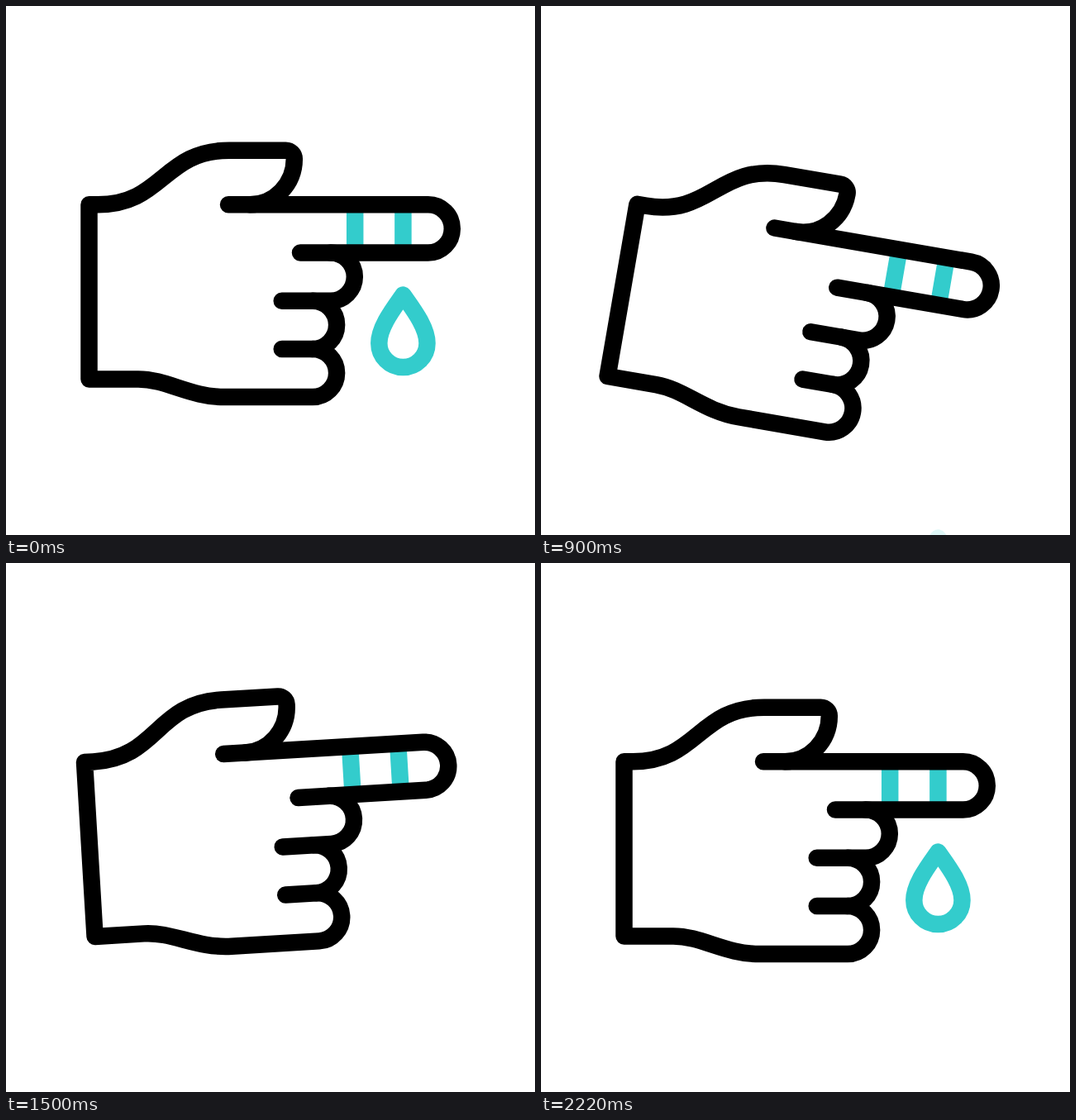
Animation, 640 px wide and 640 px high, one loop 2.4 s. Source, as an HTML page:

```html
<!DOCTYPE html>
<html lang="en">
<head>
<meta charset="utf-8">
<title>Finger prick</title>
<style>
  html, body { margin: 0; width: 100%; height: 100%; overflow: hidden; background: #fff; }
  svg { display: block; width: 100%; height: 100%; }
  path { fill: none; stroke: #000; stroke-width: 20.5; stroke-linecap: round; stroke-linejoin: round; }
  .teal { stroke: #3cc; }
  .flat { stroke-linecap: butt; }
</style>
</head>
<body>
<svg viewBox="0 0 640 640">
  <g id="drop">
    <path class="teal" d="M480.4 349.5C470 364.5 451.3 388 451.3 408a29.1 29.1 0 0 0 58.2 0C509.5 388 490.8 364.5 480.4 349.5Z"/>
  </g>
  <g id="hand">
    <path class="teal flat" d="M422.2 245V294M480.4 245V294"/>
    <path d="M269 240.3H510.7a29.1 29.1 0 0 1 0 58.2H356"/>
    <path d="M392.7 298.5a29.1 29.1 0 0 1 0 58.2H333.7"/>
    <path d="M371 356.7a29.1 29.1 0 0 1 0 58.2H333.7"/>
    <path d="M371 414.9a29.1 29.1 0 0 1 0 58.2H265C222 473.1 195 451.5 160 451.5H100.5V240.3H111C190 240.3 190 174.7 270 174.7H338.5a10.3 10.3 0 0 1 10.3 10.3C348.8 215.5 324.7 240.3 295 240.3"/>
  </g>
</svg>
<script>
  const LOOP = 2400;
  const PIVOT = '111 333';
  const DROP_X = 480.4, DROP_Y = 393.2;
  const FALL = 307, RISE = 124;

  // [time in ms, hand angle in degrees]
  const SWING = [[200, 0], [800, 11], [1400, -5], [1800, 5], [2200, 0]];

  const hand = document.getElementById('hand');
  const drop = document.getElementById('drop');

  const progress = (t, from, to) => Math.min(1, Math.max(0, (t - from) / (to - from)));
  const smooth = u => u * u * (3 - 2 * u);
  const eased = (t, from, to) => smooth(progress(t, from, to));

  function swingAngle(t) {
    let angle = SWING[0][1];
    for (let i = 1; i < SWING.length; i++) {
      const [from, a] = SWING[i - 1], [to, b] = SWING[i];
      angle += (b - a) * eased(t, from, to);
    }
    return angle;
  }

  function render(t) {
    const turn = `rotate(${swingAngle(t)} ${PIVOT})`;
    hand.setAttribute('transform', turn);

    if (t < 1400) {
      drop.setAttribute('transform', `translate(0 ${FALL * eased(t, 200, 1000)})`);
      drop.setAttribute('opacity', 1 - eased(t, 600, 1000));
    } else {
      // A new drop grows out of the fingertip and follows the hand.
      const y = DROP_Y - RISE * (1 - progress(t, 1400, 2200));
      const scale = progress(t, 1400, 1800);
      drop.setAttribute('transform',
        `${turn} translate(${DROP_X} ${y}) scale(${scale}) translate(${-DROP_X} ${-DROP_Y})`);
      drop.setAttribute('opacity', 1);
    }
  }

  const start = performance.now();
  function tick() {
    render((performance.now() - start) % LOOP);
    requestAnimationFrame(tick);
  }
  tick();
</script>
</body>
</html>
```
